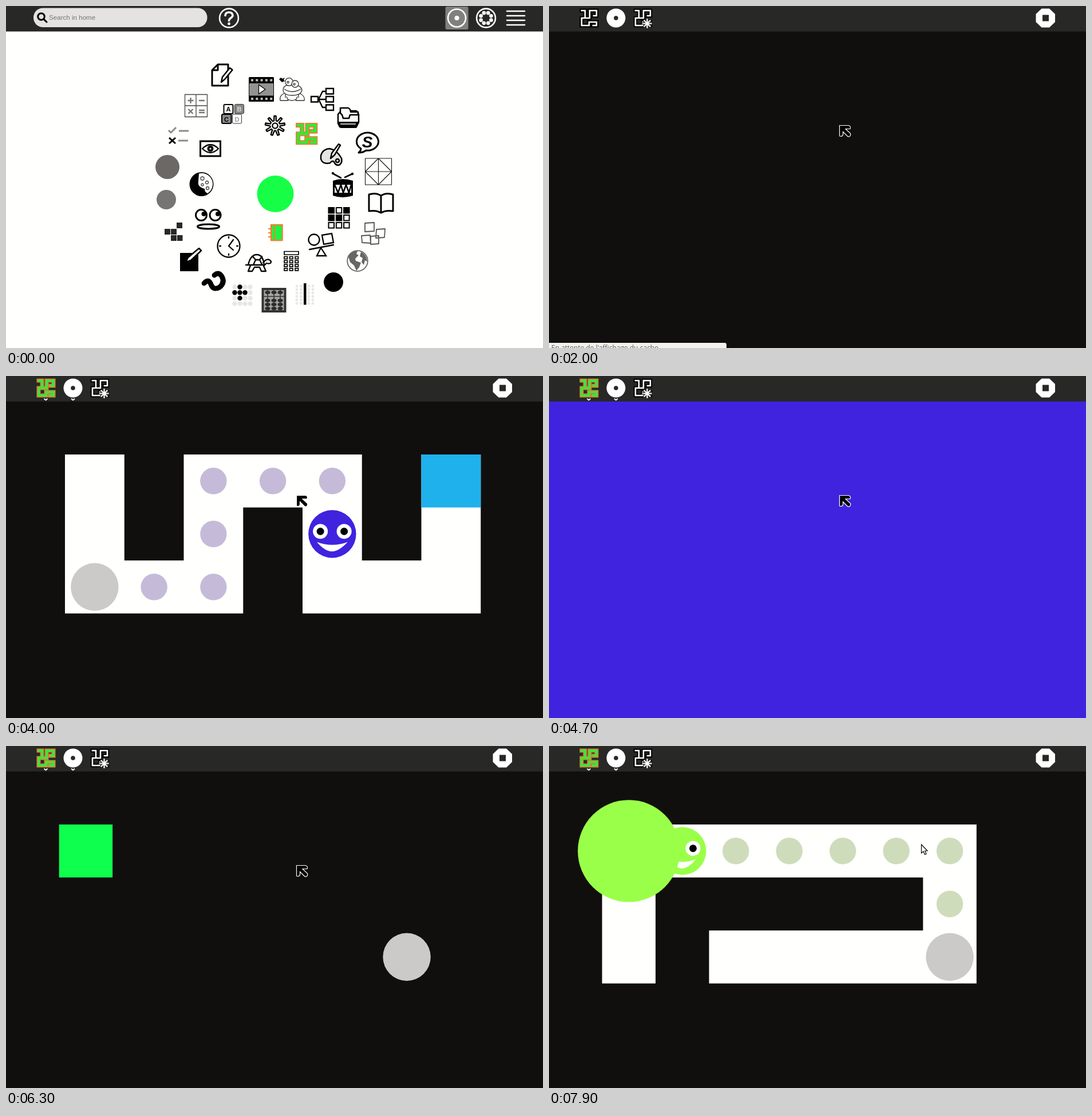
These frames come from a looping animation (938 px wide and 597 px high, 8 s). An HTML page:

```html
<!DOCTYPE html>
<html lang="en">
<head>
<meta charset="utf-8">
<title>Maze</title>
<style>
html, body { margin: 0; width: 100%; height: 100%; overflow: hidden; background: #100f0d; }
svg { display: block; width: 100vw; height: 100vh; }
text { font-family: "Liberation Sans", Arial, sans-serif; }
.b { font-weight: bold; text-anchor: middle; }
.o { fill: none; stroke: #000; stroke-width: 3; stroke-linejoin: round; stroke-linecap: round; }
.p { fill: #fffffd; stroke: #000; stroke-width: 2.5; stroke-linejoin: round; stroke-linecap: round; }
.t { fill: none; stroke: #444; stroke-width: 1.3; stroke-linejoin: round; }
.w { fill: none; stroke: #fff; stroke-width: 2.6; stroke-linecap: round; }
.x { fill: #16f846; stroke: #f08030; stroke-width: 2.5; stroke-linejoin: round; }
.thin { stroke-width: 2.3; }
.fine { stroke-width: 1.7; }
.sharp { stroke-linejoin: miter; }
.maze { fill: none; stroke-linecap: square; }
</style>
</head>
<body>
<svg viewBox="0 0 938 597">
<defs>
  <path id="walls" d="M4 4H10V17H4V30H17V24H30V30H24M10 17H18V4H30V13H25"/>
</defs>

<g id="home">
  <rect width="938" height="597" fill="#fffffd"/>
  <rect width="938" height="44.5" fill="#282826"/>
  <rect x="48" y="3.5" width="303.5" height="33.5" rx="16.5" fill="#e4e3e1"/>
  <circle class="o" cx="61.5" cy="18.5" r="5.8"/><path class="o" d="M66 23l5 5"/>
  <text x="75" y="24" font-size="11.6" fill="#757575">Search in home</text>
  <circle class="w" cx="389.5" cy="21" r="16.4"/>
  <path class="w" style="stroke-width:3.6" d="M383 16.5q.5-5.500 6.500-5.500t6.500 5.500c0 4-6.500 4.500-6.500 9"/>
  <circle cx="389.5" cy="31" r="2.4" fill="#fff"/>
  <rect x="767.5" y="1" width="40" height="40" rx="3" fill="#80807e"/>
  <circle class="w" cx="787.5" cy="21" r="15.5"/><circle cx="787.5" cy="21" r="4" fill="#fff"/>
  <circle class="w" cx="838.5" cy="21" r="16.4"/><g id="ringDots" fill="#fff"></g>
  <path class="w" d="M875 9H906M875 17H906M875 25H906M875 33H906"/>

  <!-- page and pen -->
  <path class="o" d="M370 102H388V139H360V112ZM370 103V112H361"/>
  <path class="p" d="M376 133l2-9 13-16 4.500 3.500-13 16z"/>
  <!-- film -->
  <g id="film">
    <rect x="424" y="124" width="44" height="43" rx="1.5"/>
    <rect x="425" y="135" width="42" height="21.5" fill="#939391"/>
    <path d="M428 129.5H466M428 162H466" stroke="#bbb" stroke-width="4" stroke-dasharray="4 4.300"/>
    <path d="M441.5 137.5v16l11.500-8z" fill="#fff" stroke="#000" stroke-width="1.3"/>
  </g>
  <!-- frog -->
  <g class="t" style="stroke:#333">
    <path d="M487 152Q477 156 479 165H493L490 158M512 152Q523 157 521 165H506L509 158M493 163Q499 167 506 163M488 152V160M511 152V160"/>
    <path fill="#fffffd" d="M484 147Q484 139 493 138H507Q516 140 517 147Q515 156 500 156T484 147ZM486 145Q500 154 515 145"/>
    <circle cx="494.5" cy="132.5" r="6.8" fill="#fffffd"/><circle cx="505" cy="136" r="6" fill="#fffffd"/>
    <circle cx="492.5" cy="133" r="1.6"/><circle cx="503.5" cy="136.5" r="1.6"/>
  </g>
  <path d="M477 128l3-3 3 2 4-2-2 4 2 2-5 2z"/>
  <!-- tree -->
  <path class="o thin sharp" d="M533 158h12v9.500h-12zM559 144h13v9.500h-13zM559 158h13v9.500h-13zM559 172.500h13v9.500h-13zM545 163H558M547 161L553 149H558M547 165L553 177H558"/>
  <!-- stamp -->
  <path class="p" d="M580 189L585 183H612L616 189V203L612 211H583L580 205Z"/>
  <path class="p" d="M584 178H598Q602 180 602 185H615V190H601L599 196H589L587 190L584 187Z"/>
  <path d="M580 202H616L612 213H584Z"/><path d="M584 206H611" stroke="#fffffd" stroke-width="1.5"/>
  <!-- arithmetic -->
  <path class="t" d="M312.500 154.500h39v39h-39zM332 154.500v39M312.500 174h39"/>
  <path class="t" style="stroke:#777;stroke-width:2.4" d="M317.500 165h10M322.500 160v10M337 165h10M318.500 180l8 8m0-8l-8 8M337 182h10m-10 4h10"/>
  <!-- letters -->
  <g font-size="11">
    <rect class="p" x="380.500" y="172" width="16" height="16" rx="2" style="stroke-width:2"/><text class="b" x="388.5" y="184">A</text>
    <rect x="399.5" y="171.5" width="16" height="16.5" rx="2" fill="#888" stroke="#333"/><text class="b" x="407.5" y="184" fill="#ddd">B</text>
    <rect x="377" y="189" width="16.5" height="16" rx="2" fill="#888" stroke="#000" stroke-width="2"/><text class="b" x="385" y="201.5">C</text>
    <rect x="395.5" y="189" width="16" height="16" rx="2" fill="#fff" stroke="#333"/><text class="b" x="403.5" y="201.5" fill="#999">D</text>
  </g>
  <!-- checks -->
  <path class="o" style="stroke:#8b8b89;stroke-linecap:butt" d="M284 217l4 4 9-9M302 218h17M301 235h17"/>
  <path class="o" style="stroke-linecap:butt" d="M285 230l11 10m0-10l-11 10"/>
  <!-- eye -->
  <rect class="o sharp" x="339.5" y="236" width="35" height="26"/>
  <path class="o thin" d="M343 249Q357 235 371 249Q357 263 343 249Z"/><circle cx="357" cy="249" r="5.5"/><circle cx="357" cy="249" r="1.6" fill="#fff"/>
  <path id="gear" class="o thin"/><circle class="o thin" cx="470" cy="209" r="4.6"/>
  <g id="mazeIcon"><g class="maze" transform="translate(505.5 203.5) scale(1.16)">
    <use href="#walls" stroke="#ee7d32" stroke-width="7"/><use href="#walls" stroke="#2cec36" stroke-width="3.8"/>
  </g></g>
  <!-- palette -->
  <path class="o" style="fill:#e4e4e2;stroke-width:2.5" d="M550 261Q553 250 565 249Q578 251 586 266Q588 275 581 278Q575 278 573 272Q570 269 566 274Q553 277 550 267Z"/>
  <circle class="p" cx="579" cy="270" r="3"/><path class="p" d="M567 266l2-9 12-16 3 2-10 17z"/>
  <!-- speech -->
  <path class="o" d="M620 249A19 15.500 0 1 1 629 252Q624 256 616 256Q620 253 620 249Z"/>
  <text class="b" x="631" y="247" font-size="28" font-style="italic">S</text>
  <path class="t" style="stroke:#111;stroke-width:1.1" d="M627.500 266h46v46h-46zM627.500 289h46M650.500 266v46M627.500 289l23-23 23 23-23 23z"/>
  <!-- drum -->
  <path d="M571 305Q588 299 606 305V331Q588 337 571 331Z"/><path d="M574 312H603V326H574Z" fill="#fffffd"/>
  <path class="o" style="stroke-width:2.6" d="M574 312l6 14 5-14 4 14 5-14 5 14 4-14M572 293l13 7M605 293l-13 6"/>
  <circle cx="571" cy="292" r="2.2"/><circle cx="605" cy="293" r="2.2"/>
  <!-- moon -->
  <circle cx="341.5" cy="311" r="21"/><path d="M337 292.500A19 19 0 0 1 352 327Q347 325 347 319Q334 316 336 306Z" fill="#fffffd"/>
  <g class="t"><circle cx="343" cy="301" r="3"/><circle cx="351" cy="308" r="2.5"/><circle cx="343" cy="312" r="2"/><circle cx="352" cy="318" r="2.5"/></g>
  <g id="tiles" class="o sharp" style="stroke-width:2"></g>
  <!-- book -->
  <path class="o" d="M655 331Q646 325 634 329V358Q647 356 655 361Q663 356 676 358V329Q664 325 655 331V360"/>
  <path class="p" style="stroke:#555;stroke-width:1.8" d="M627 379l16-1v15l-16 1zM647 390l15-1-1 15-15 1zM621 401l15-1 1 14-15-1zM637 402l14-1v14l-14 1z"/>
  <!-- face -->
  <circle class="o" cx="341" cy="365" r="9.5"/><circle class="o" cx="365.5" cy="365" r="9.5"/>
  <circle cx="345.5" cy="363" r="4"/><circle cx="370" cy="363" r="4"/><ellipse class="o" cx="353.5" cy="385" rx="19" ry="4"/>
  <path fill="#2a2927" d="M298 378h10v10h-10zM277 389h10v10h-10zM288 389h10v10h-10zM288 400h10v10h-10zM299 400h9.500v10h-9.500z"/>
  <!-- clock -->
  <circle class="o thin" cx="389" cy="419" r="19.5"/><path class="o thin" d="M397 408l-8 11 8 7M389 403v2M389 433v2M373 419h2M403 419h2"/>
  <!-- marks -->
  <circle cx="470.5" cy="328" r="32" fill="#16ff46"/>
  <circle cx="282" cy="281" r="21" fill="#6b6866"/>
  <circle cx="280" cy="338" r="17" fill="#777573"/>
  <circle cx="572" cy="482" r="17"/>
  <rect x="304" y="431" width="32" height="32"/>
  <path class="p" d="M314 447l4-8 19-16 4 4-18 17z"/>
  <!-- journal -->
  <path class="x" d="M463 382h19.500v27H463z"/><path d="M469 382v27M458 389h7M458 396h7M458 403h7" stroke="#f08030" stroke-width="2.2"/>
  <!-- balance -->
  <circle class="o thin" cx="538" cy="408" r="9.5"/><path class="o thin sharp" d="M552 400l17-3 3 16-17 3zM530 425L572 417M550 422l9 14h-16z"/>
  <!-- globe -->
  <circle cx="614" cy="445" r="17.8" fill="#fffffd" stroke="#666" stroke-width="1.8"/>
  <path fill="#666" d="M598 437Q605 427 614 428l-2 5 4 2-6 6 1 4 9 3-3 8-5 6-4-9-7-6zM620 429Q630 434 631 446l-4-2-2 8-4-5 2-7-5-3z"/>
  <!-- turtle -->
  <path class="o thin" d="M423 452Q427 434 438 434T451 452ZM423 452h-4M427 453l-4 10h7l4-7h9l3 7h8l-4-9 5-5Q463 451 463 446Q459 440 453 444L449 448M431 437l5 6h7l4-6M436 443l-4 9M443 443l4 8"/>
  <!-- calculator -->
  <path class="o fine sharp" d="M486 428.500h25v5.500h-25z"/><g id="keys" class="o fine sharp"></g>
  <!-- snake -->
  <g fill="none" stroke-linecap="round">
    <path id="snake" stroke="#000" stroke-width="8.5" d="M346 484Q354 475 358 486T373 491Q383 483 377 472Q371 463 364 470"/>
    <use href="#snake" style="stroke:#fffffd;stroke-width:3.5"/>
  </g>
  <g id="dots"></g>
  <!-- abacus -->
  <rect x="448.500" y="494" width="39" height="39" fill="#a5a5a3" stroke="#333" stroke-width="4"/>
  <path d="M449 507h38M457 496v35M468 496v35M479 496v35" stroke="#333" stroke-width="1.6"/><g id="beads" fill="#2c2c2a"></g>
  <rect x="520" y="484" width="4.5" height="37.5"/>
</g>

<g id="game">
  <rect width="938" height="597" fill="#100f0d"/>
  <g id="board"></g>
  <rect width="938" height="44.5" fill="#282826"/>
  <g id="tools">
    <g class="maze" transform="translate(53 4)"><use id="mazeEdge" href="#walls" stroke-width="7"/><use id="mazeFill" href="#walls"/></g>
    <circle cx="117" cy="21" r="16.5" fill="#fff"/><circle cx="117" cy="21" r="3.8" fill="#282826"/>
    <g class="maze" transform="translate(147 4)"><use href="#walls" stroke="#000" stroke-width="6.5"/><use href="#walls" stroke="#fff" stroke-width="2.6"/></g>
    <path id="sparkBack" stroke="#282826" stroke-width="5"/><path id="spark" stroke="#fff" stroke-width="2.2"/>
    <path id="arrows" class="w" style="stroke-width:1.8" d="M67 40l2.500 2 2.500-2M114.500 40l2.500 2 2.500-2"/>
    <path d="M860.500 4.500h13.500l10 9.500v14l-10 9.500h-13.500l-10-9.500v-14z" fill="#fff"/><rect x="862" y="15.5" width="11" height="11" fill="#282826"/>
  </g>
  <g id="status"><path d="M0 588H307q3 0 3 3v6H0z" fill="#f1f1ed"/>
    <text x="4" y="600.5" font-size="12" fill="#5f5f5d" style="font-family:'Open Sans',sans-serif">En attente de l'affichage du cache...</text></g>
</g>

<path id="arrow" d="M0 0H16Q20 1 18.500 6H10.500L19 14Q20 18 17 19.500Q15 20 13.500 18.500L6 11V16Q5 20 0 18.500Z" stroke="#fff" stroke-width="1.2"/>
<path id="pointer" d="M0 0V15L3.500 12L6 17.500L8.500 16.300L6.200 11H10.500Z" fill="#fff" stroke="#000" stroke-width="1.2"/>
</svg>

<script>
const LOOP = 8000, STEP = 100, TOP = 137, ROW = 92.5;
const $ = id => document.getElementById(id);
const clamp = v => Math.max(0, Math.min(1, v));
const mix = (a, b, p) => a + (b - a) * p;
const ease = p => p * p * (3 - 2 * p);
const show = (id, on) => $(id).setAttribute('display', on ? 'inline' : 'none');
const place = (id, x, y) => $(id).setAttribute('transform', `translate(${x} ${y})`);
const circle = (x, y, r, fill) => `<circle cx="${x}" cy="${y}" r="${r}" fill="${fill}"/>`;
const polar = (x, y, r, a) => [x + r * Math.cos(a), y + r * Math.sin(a)];
const repeat = (cols, rows, draw) => {
  let out = '';
  for (let j = 0; j < rows; j++) for (let i = 0; i < cols; i++) out += draw(i, j);
  return out;
};

function buildIcons() {
  $('ringDots').innerHTML = repeat(8, 1, i => circle(...polar(838.5, 21, 9.6, (i + .5) * Math.PI / 4), 3.3, '#fff'));
  const teeth = [];
  for (let i = 0; i < 9; i++)
    for (const [r, d] of [[8.8, -.22], [17.2, -.09], [17.2, .09], [8.8, .22]])
      teeth.push(polar(470, 209, r, i * Math.PI * 2 / 9 - Math.PI / 2 + d));
  $('gear').setAttribute('d', 'M' + teeth.join('L') + 'Z');
  const filled = ['101', '110', '000'];
  $('tiles').innerHTML = repeat(3, 3, (i, j) =>
    `<rect x="${563.5 + i * 13.3}" y="${352 + j * 13}" width="9.5" height="9.5" fill="${filled[j][i] > 0 ? '#000' : 'none'}"/>`);
  $('keys').innerHTML = repeat(3, 4, (i, j) =>
    `<rect x="${486 + i * 9.5}" y="${437.5 + j * 6.8}" width="5.5" height="4"/>`);
  const lit = (i, j) => (i === 1 && j < 3) || (j === 1 && i < 3);
  $('dots').innerHTML =
    repeat(4, 4, (i, j) => circle(399.5 + i * 9, 490.5 + j * 9.7, 4.2, lit(i, j) ? '#000' : '#e8e8e6')) +
    repeat(5, 6, (i, j) => circle(508 + i * 7, 489 + j * 6, 2.4, '#e8e8e6'));
  $('beads').innerHTML = repeat(3, 4, (i, j) =>
    `<ellipse cx="${457 + i * 11}" cy="${[500, 514, 521, 528][j]}" rx="4.6" ry="3"/>`);
  let rays = '';
  for (let i = 0; i < 4; i++)
    rays += 'M' + polar(171.5, 30.5, 8.2, i * Math.PI / 4) + 'L' + polar(171.5, 30.5, -8.2, i * Math.PI / 4);
  for (const id of ['spark', 'sparkBack']) $(id).setAttribute('d', rays);
}

// Corners in cell units become a cell-by-cell route.
function route(corners) {
  const cells = [corners[0]];
  for (const [x, y] of corners.slice(1)) {
    let [cx, cy] = cells[cells.length - 1];
    while (cx !== x || cy !== y) {
      cx += Math.sign(x - cx);
      cy += Math.sign(y - cy);
      cells.push([cx, cy]);
    }
  }
  return cells;
}

const levels = [
  { left: 103, col: 103.75, ground: 'M0 0h1v2h1v-2h3v2h1v-2h1v3h-3v-2h-1v2h-3z',
    cells: route([[0, 2], [2, 2], [2, 0], [4, 0], [4, 2], [6, 2], [6, 0]]),
    color: '#3f23df', trail: '#c5bbd8', grow: 2300, open: 3100, run: 3300, win: 4367 },
  { left: 92.7, col: 93.44, ground: 'M0 0h7v3h-5v-1h4v-1h-5v2h-1z',
    cells: route([[6, 2], [6, 0], [0, 0]]),
    color: '#9aff49', trail: '#cfdcbc', grow: 5500, open: 6400, run: 7200, win: 7867 }
];

function goalColor(t) {
  const keys = [[3000, 222, 93, 46], [4000, 197, 84, 52], [6300, 136, 100, 53]];
  const [a, b] = t < 4000 ? keys : keys.slice(1);
  const p = (t - a[0]) / (b[0] - a[0]);
  return `hsl(${mix(a[1], b[1], p)} ${mix(a[2], b[2], clamp(p))}% ${mix(a[3], b[3], clamp(p))}%)`;
}

function face(x, y, col, color) {
  const dx = col * .2, m = col * .26;
  const eye = ex => circle(ex, y - 4.5, 13, '#fffffd') + circle(ex, y - 4.5, 6.5, '#000');
  return circle(x, y, 41.7, color) + eye(x - dx) + eye(x + dx) +
    `<path d="M${x - m} ${y + 14}Q${x} ${y + 24} ${x + m} ${y + 14}Q${x + m * .45} ${y + 30} ${x} ${y + 30.5}T${x - m} ${y + 14}Z" fill="#fffffd"/>`;
}

function drawLevel(l, t) {
  const at = ([i, j]) => [l.left + (i + .5) * l.col, TOP + (j + .5) * ROW];
  const last = l.cells.length - 1;
  const [sx, sy] = at(l.cells[0]), [gx, gy] = at(l.cells[last]);
  const k = 1 - (1 - clamp((t - l.grow) / 800)) ** 2;
  let out = '';
  if (t >= l.open)
    out += `<path d="${l.ground}" transform="translate(${l.left} ${TOP}) scale(${l.col} ${ROW})" fill="#fffffd"/>`;
  out += `<rect x="${gx - l.col * k / 2}" y="${gy - ROW * k / 2}" width="${l.col * k}" height="${ROW * k}" fill="${goalColor(t)}"/>`;
  out += circle(sx, sy, 41.7 * k, '#cbcac8');
  if (t >= l.run) {
    const n = Math.min((t - l.run) / 100, last - 1), i = Math.floor(n);
    for (const c of l.cells.slice(1, Math.ceil(n))) out += circle(...at(c), 23.2, l.trail);
    const a = at(l.cells[i]), b = at(l.cells[i + 1]);
    out += face(mix(a[0], b[0], n - i), mix(a[1], b[1], n - i), l.col, l.color);
  }
  if (t > l.win) out += circle(gx, gy, 2.7 * (t - l.win), l.color);
  return out;
}

function zoom(id, x, y, s) {
  $(id).setAttribute('transform', `translate(${x} ${y}) scale(${s}) translate(${-x} ${-y})`);
}

function drawCursor(t) {
  const mouse = t >= 6600;
  let x = 507.5, y = 208.5;
  if (t < 600) [x, y] = [327, 81];
  else if (t < 1300) {
    const p = ease(clamp((t - 700) / 600));
    [x, y] = [mix(449, x, p), mix(160, y, p)];
  } else if (mouse) {
    const p = ease(clamp((t - 6500) / 700));
    [x, y] = [mix(x, 650.5, p), mix(y, 172, p)];
  }
  show('arrow', t >= 500 && !mouse);
  show('pointer', mouse);
  place(mouse ? 'pointer' : 'arrow', x, y);
}

function render(t) {
  const inGame = t >= 1900, ready = t >= 2300;
  show('home', !inGame);
  show('game', inGame);
  zoom('film', 446, 145.5, t >= 600 && t < 1100 ? 1.18 : 1);
  zoom('mazeIcon', 525.5, 223.5, 1 + .2 * clamp((t - 1200) / 200));
  show('tools', t >= 2000);
  show('arrows', ready);
  show('status', !ready);
  $('mazeEdge').setAttribute('stroke', ready ? '#dc7c38' : '#000');
  $('mazeFill').setAttribute('stroke', ready ? '#3de63b' : '#fff');
  $('mazeFill').setAttribute('stroke-width', ready ? 3.8 : 2.6);
  $('board').innerHTML = ready ? drawLevel(levels[t < 5500 ? 0 : 1], t) : '';
  drawCursor(t);
}

buildIcons();
const begin = performance.now();
function tick() {
  const t = (performance.now() - begin) % LOOP;
  render(Math.floor(t / STEP) * STEP);
  requestAnimationFrame(tick);
}
tick();
</script>
</body>
</html>
```
